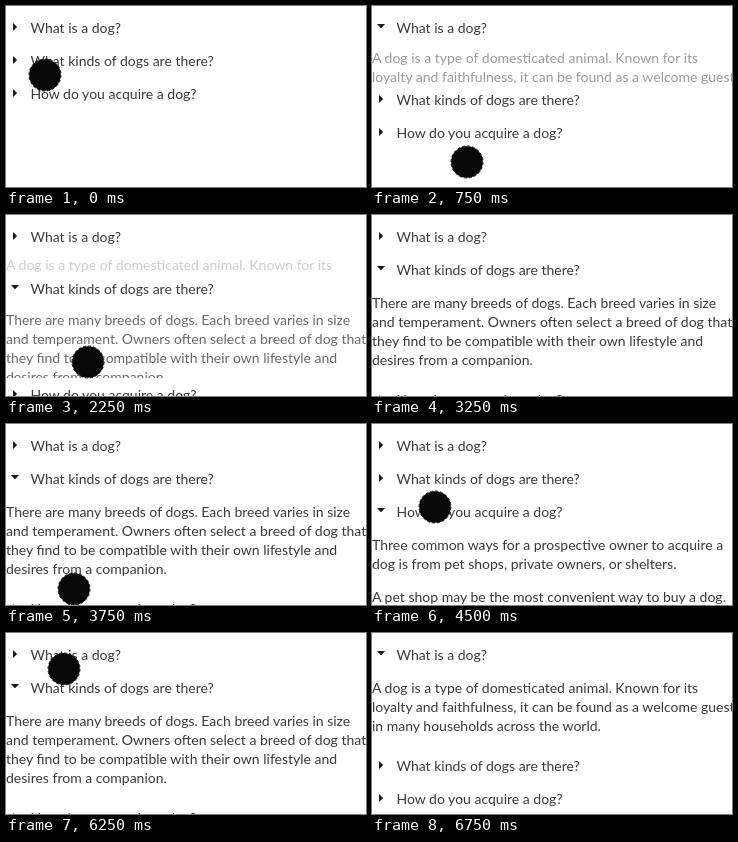
An HTML page for the animation above (7.5 s loop, 360 px wide and 181 px high).

```html
<!DOCTYPE html>
<html lang="en">
<head>
<meta charset="utf-8">
<title>Accordion</title>
<style>
html, body { margin: 0; width: 100%; height: 100%; overflow: hidden; background: #fff; }
#stage {
  position: relative; width: 360px; height: 181px; overflow: hidden; background: #fff;
  font: 14px/19px Lato, Carlito, sans-serif; color: #3a3a3a; white-space: nowrap;
}
.head, .panel { position: absolute; left: 0; top: 0; width: 360px; }
.head { height: 19px; padding-left: 24.5px; }
.head::before {
  content: ""; position: absolute; left: 7px; top: 5px; width: 4.2px; height: 8px;
  background: #1c1c1c; clip-path: polygon(0 0, 100% 50%, 0 100%);
}
.head.open::before {
  left: 5px; top: 6px; width: 8px; height: 4.4px;
  clip-path: polygon(0 0, 100% 0, 50% 100%);
}
.panel { overflow: hidden; }
.panel p { margin: 0 0 14px; }
#dot { position: absolute; left: -17px; top: -17px; }
</style>
</head>
<body>
<div id="stage">
  <div class="head">What is a dog?</div>
  <div class="panel">
    <p>A dog is a type of domesticated animal. Known for its<br>loyalty and faithfulness, it can be found as a welcome guest<br>in many households across the world.</p>
  </div>
  <div class="head">What kinds of dogs are there?</div>
  <div class="panel">
    <p>There are many breeds of dogs. Each breed varies in size<br>and temperament. Owners often select a breed of dog that<br>they find to be compatible with their own lifestyle and<br>desires from a companion.</p>
  </div>
  <div class="head">How do you acquire a dog?</div>
  <div class="panel">
    <p>Three common ways for a prospective owner to acquire a<br>dog is from pet shops, private owners, or shelters.</p>
    <p>A pet shop may be the most convenient way to buy a dog.</p>
  </div>
  <svg id="dot" width="34" height="34" viewBox="-17 -17 34 34">
    <circle r="15.8" fill="#070707"/>
    <circle r="16" fill="none" stroke="#070707" stroke-width="0.9" stroke-dasharray="3 2"/>
  </svg>
</div>
<script>
const LOOP = 7500, STEP = 250, SLIDE = 200, MOVE = 500;
const heads = [...document.querySelectorAll('.head')];
const panels = [...document.querySelectorAll('.panel')];
const dot = document.getElementById('dot');
const heights = panels.map(p => p.scrollHeight);

const clicks = [
  { at: 650, panel: 0 }, { at: 2116, panel: 1 }, { at: 3900, panel: 2 },
  { at: 5326, panel: 1 }, { at: 6400, panel: 0 }
];

// The pointer makes one move every MOVE ms while a visit lasts.
const visits = [
  { from: 0, to: 1250, stops: [[39, 69], [48, 36], [97, 160]] },
  { from: 1500, to: 3250, stops: [[97, 160], [79, 143], [82, 147], [78, 170]] },
  { from: 3500, to: 6750, stops: [[72, 172], [68, 165], [63, 83], [72, 49], [77, 66], [58, 36]] }
];

const swing = x => 0.5 - Math.cos(Math.PI * Math.min(1, x)) / 2;
const easeOut = x => 1 - (1 - x) ** 5;

function drawPanels(t) {
  const k = clicks.findLastIndex(c => c.at <= t);
  const now = clicks[k], before = clicks[k - 1];
  const s = now ? swing((t - now.at) / SLIDE) : 0;
  let y = 12;
  heads.forEach((head, i) => {
    const p = now?.panel === i ? s : before?.panel === i ? 1 - s : 0;
    head.style.top = Math.round(y) + 'px';
    head.classList.toggle('open', now?.panel === i);
    Object.assign(panels[i].style, {
      top: Math.round(y + 26.5 + 6.5 * p) + 'px',
      height: heights[i] * p + 'px',
      opacity: p
    });
    y += 33 + p * (6.5 + heights[i]);
  });
}

function drawDot(t) {
  const visit = visits.find(v => v.from <= t && t < v.to);
  dot.style.display = visit ? 'block' : 'none';
  if (!visit) return;
  const u = (t - visit.from) / MOVE, i = Math.floor(u);
  const last = visit.stops.at(-1);
  const a = visit.stops[i] ?? last, b = visit.stops[i + 1] ?? last;
  const [x, y] = a.map((v, n) => Math.round(v + (b[n] - v) * easeOut(u - i)));
  dot.style.transform = `translate(${x}px, ${y}px)`;
}

const start = performance.now();
function tick() {
  const t = (performance.now() - start) % LOOP;
  const held = Math.floor(t / STEP) * STEP;
  drawPanels(held);
  drawDot(held);
  requestAnimationFrame(tick);
}
tick();
</script>
</body>
</html>
```
